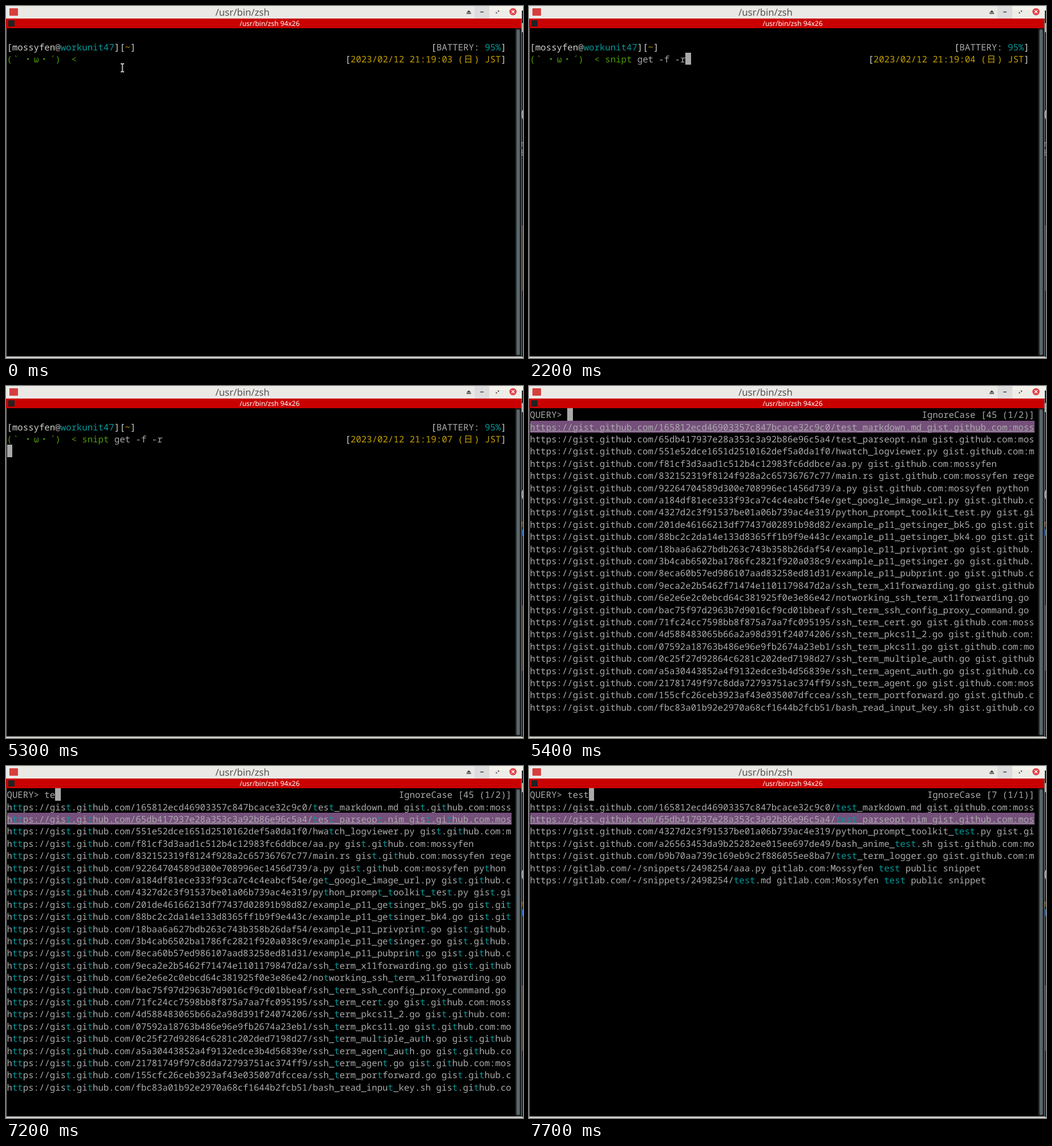
Animation of 906 by 618 pixels, one loop 8000 ms. Source, as an HTML page:

```html
<!DOCTYPE html>
<html lang="en">
<head>
<meta charset="utf-8">
<title>/usr/bin/zsh</title>
<style>
html, body { margin: 0; width: 100%; height: 100%; overflow: hidden; background: #000; }
#stage { position: absolute; left: 0; top: 0; width: 906px; height: 618px; overflow: hidden; background: #000; }
#stage svg { position: absolute; left: 0; top: 0; }
svg text { font-family: "Noto Sans", "Open Sans", sans-serif; text-rendering: geometricPrecision; text-anchor: middle; }
#term { font: 15.683px/21.4px "Noto Sans Mono", "DejaVu Sans Mono", monospace; text-rendering: geometricPrecision;
  font-kerning: none; font-variant-ligatures: none; color: #aaa; }
#term span, #term i { position: absolute; white-space: pre; }
#term i { height: 21.4px; }
#term b { font-weight: 400; color: #06989a; }
#term .hi { color: #d0d3cc; }
#term .cyan { color: #06989a; }
#term .yellow { color: #c4a000; }
#term .green { color: #4e9a06; }
#term .red { color: #cc0000; font-weight: 700; }
#term .dim { color: #5a5a5a; }
#term .dark { color: #1c1c1c; }
#term .black { color: #000; }
#term .sel { text-decoration: underline; }
#term .cjk { font-family: "Noto Sans Mono", "Noto Sans CJK JP", "Noto Sans CJK", sans-serif; }
</style>
</head>
<body>
<div id="stage">
  <svg width="906" height="618" viewBox="0 0 906 618">
    <rect width="906" height="22" fill="#ebe9e6"/>
    <rect x="821" width="26" height="22" fill="#dedddd"/>
    <rect x="847" width="56" height="22" fill="#efede8"/>
    <rect x="847" width="59" height="7" fill="#f4f2ea"/>
    <rect x="6" y="4" width="15" height="13" rx="1" fill="#d5403d"/>
    <text x="414.5" y="17" font-size="16.7" fill="#555">/usr/bin/zsh</text>
    <path d="M807 11.5l4-4 4 4zM807 12.6h8v1.4h-8z" fill="#444"/>
    <path d="M831 10.5h6" stroke="#444" stroke-width="1.5"/>
    <path d="M861 8h3v3zM858.5 10v3h3z" fill="#444"/>
    <circle cx="888.5" cy="10" r="6.3" fill="#e0444c"/>
    <path d="M886 7.5l5 5m0-5l-5 5" stroke="#fff" stroke-width="1.3"/>
    <rect y="22" width="903" height="17" fill="#c80000"/>
    <rect x="4" y="25" width="11" height="11" fill="#222"/>
    <text x="462" y="34.6" font-size="12" fill="#fff">/usr/bin/zsh 94x26</text>
    <rect y="39" width="1" height="577" fill="#8a8a8a"/>
    <rect x="892" y="39" width="11" height="576" fill="#171b1c"/>
    <rect x="894.5" y="41" width="6" height="572" rx="3" fill="#59666a"/>
    <rect x="903" y="22" width="1" height="594" fill="#77797a"/>
    <rect x="904" y="8" width="2" height="608" fill="#1d1d1d"/>
    <rect x="904" y="30" width="2" height="16" fill="#b5b5b5"/>
    <path d="M906.5 182q-4 8 0 17" fill="none" stroke="#ddd" stroke-width="1.5"/>
    <rect x="904" y="385" width="2" height="115" fill="#45423e"/>
    <rect y="615" width="904" height="1" fill="#8f8f8d"/>
    <rect y="616" width="906" height="2" fill="#d4d1ca"/>
    <path id="letter" d="M904 247v-8m0 2q1-2 2-2" fill="none" stroke="#aaa"/>
    <path id="box" d="M906 253h-2v9h2m0-5h-2" fill="none" stroke="#aaa"/>
    <rect id="blue" x="903" y="252" width="3" height="11" fill="#2c62ac"/>
  </svg>
  <div id="term"></div>
  <svg id="pointer" width="906" height="618" viewBox="0 0 906 618" fill="none">
    <path d="M201 101.5h2l1 1 1-1h2M204 102v13M201 115.5h2l1-1 1 1h2" stroke="#333" stroke-width="3"/>
    <path d="M201 101.5h2l1 1 1-1h2M204 102v13M201 115.5h2l1-1 1 1h2" stroke="#ddd" stroke-width="1.3"/>
  </svg>
</div>
<script>
const COLS = 94, CELL = 9.41, ROW = 21.4, LEFT = 1.55, TOP = 39.2, LOOP = 8000;
const USER = "mossyfen", HOST = "workunit47";
const $ = id => document.getElementById(id);

const gists = `165812ecd46903357c847bcace32c9c0/test_markdown.md
65db417937e28a353c3a92b86e96c5a4/test_parseopt.nim
551e52dce1651d2510162def5a0da1f0/hwatch_logviewer.py
f81cf3d3aad1c512b4c12983fc6ddbce/aa.py
832152319f8124f928a2c65736767c77/main.rs regex
92264704589d300e708996ec1456d739/a.py python
a184df81ece333f93ca7c4c4eabcf54e/get_google_image_url.py
4327d2c3f91537be01a06b739ac4e319/python_prompt_toolkit_test.py
201de46166213df77437d02891b98d82/example_p11_getsinger_bk5.go
88bc2c2da14e133d8365ff1b9f9e443c/example_p11_getsinger_bk4.go
18baa6a627bdb263c743b358b26daf54/example_p11_privprint.go
3b4cab6502ba1786fc2821f920a038c9/example_p11_getsinger.go
8eca60b57ed986107aad83258ed81d31/example_p11_pubprint.go
9eca2e2b5462f71474e1101179847d2a/ssh_term_x11forwarding.go
6e2e6e2c0ebcd64c381925f0e3e86e42/notworking_ssh_term_x11forwarding.go
bac75f97d2963b7d9016cf9cd01bbeaf/ssh_term_ssh_config_proxy_command.go
71fc24cc7598bb8f875a7aa7fc095195/ssh_term_cert.go
4d588483065b66a2a98d391f24074206/ssh_term_pkcs11_2.go
07592a18763b486e96e9fb2674a23eb1/ssh_term_pkcs11.go
0c25f27d92864c6281c202ded7198d27/ssh_term_multiple_auth.go
a5a30443852a4f9132edce3b4d56839e/ssh_term_agent_auth.go
21781749f97c8dda72793751ac374ff9/ssh_term_agent.go
155cfc26ceb3923af43e035007dfccea/ssh_term_portforward.go
fbc83a01b92e2970a68cf1644b2fcb51/bash_read_input_key.sh
a26563453da9b25282ee015ee697de49/bash_anime_test.sh
c4348860fe15ef4d7158b26d52f1e39f/ssh_term_http_proxy.go
8f7e1b06a9a6e0b6f43a10bf29850e3a/ssh_term_socks5_proxy.go
a90b01dee1e86f430a8f979c9b6022ec/ssh_term_multiple_proxy.go
1289a2ae2b308a16a3301e2db2b63cdd/ssh_term_proxy.go
038541ca650eab28bd32e98592193bf0/ssh_term_with_timestamp_log.go
b37c9600837f37b1bc5d8937e0276f08/ssh_term_with_log.go
c915d15f825624893d3983b8b462155e/term_ssh.go
b9b70aa739c169eb9c2f886055ee8ba7/test_term_logger.go
f19d1e94b5f89f3e1fef520d3ecc7b59/gistfile1.md text`;

const entries = gists.split("\n").map(line => {
  const [path, note = ""] = line.split(" ");
  return `https://gist.github.com/${path} gist.github.com:${USER} ${note}`;
});
for (const file of ["aaa.py", "test.md"])
  entries.push(`https://gitlab.com/-/snippets/2498254/${file} gitlab.com:Mossyfen test public snippet`);

const x = col => (LEFT + col * CELL).toFixed(2);
const y = row => TOP + row * ROW;
const esc = s => s.replace(/&/g, "&amp;").replace(/</g, "&lt;");
const html = (col, row, markup, cls = "") =>
  `<span class="${cls}" style="left:${x(col)}px;top:${(y(row) + 1).toFixed(2)}px">${markup}</span>`;
const put = (col, row, text, cls) => html(col, row, esc(text), cls);
const block = (col, row, color = "#aaa", cells = 1) =>
  `<i style="left:${x(col)}px;top:${y(row).toFixed(2)}px;width:${cells * CELL}px;background:${color}"></i>`;

// Prompt line; hint is the dim suggestion after the typed command.
function shell(cmd, sec, caret, hint = "") {
  const name = cmd.slice(0, 5), end = 14 + cmd.length;
  let out = put(0, 1, "[" + USER, "hi") + put(9, 1, "@") + put(10, 1, HOST, "cyan") +
    put(20, 1, "][", "hi") + put(22, 1, "~", "yellow") + put(23, 1, "]", "hi") +
    put(79, 1, "[", "hi") + put(80, 1, "BATTERY:") + put(89, 1, "95%", "cyan") + put(92, 1, "]", "hi") +
    put(0, 2, "(", "green") + put(1.2, 2, "`", "green") + put(3.1, 2, "・", "green cjk") + put(5, 2, "ω", "green") +
    put(6.1, 2, "・", "green cjk") + put(8, 2, "´)", "green") + put(12, 2, "<", "green") +
    put(63, 2, "[", "hi") + put(64, 2, "2023/02/12 21:19:0" + sec + " (", "yellow") +
    put(85.1, 2, "日", "yellow cjk") + put(87, 2, ") JST", "yellow") + put(92, 2, "]", "hi");
  if (caret) out += caret === "next" ? block(0, 3) : block(end, 2, hint ? "#666" : undefined);
  out += put(14, 2, name, name === "snipt" ? "green" : "red") + put(19, 2, cmd.slice(5));
  if (hint) out += put(end, 2, hint[0], "dark") + put(end + 1, 2, hint.slice(1), "dim");
  return out;
}

// Filter screen; needle may lag behind the typed query.
function picker(query, needle, count, sel = 2, more = "") {
  const info = `IgnoreCase [${count}]`;
  let out = block(7 + query.length, 0) + put(0, 0, "QUERY> " + query) + put(COLS - info.length, 0, info) +
    block(0, sel, "#75507b", COLS);
  entries.filter(e => e.includes(needle)).slice(0, 24).forEach((e, i) => {
    const line = e.slice(0, COLS);
    out += html(0, i + 1, needle ? line.replaceAll(needle, `<b>${needle}</b>`) : line, i + 1 === sel ? "sel" : "");
  });
  if (more === "block") out += block(COLS - 1, 25);
  if (more) out += put(COLS - 1, 25, "v", more === "block" ? "black" : "");
  return out;
}

const full = "snipt get -f -r";
const steps = [
  [0, () => shell("", 3)],
  [100, () => shell("", 4, "here")],
  [200, () => shell("s", 4, "here")],
  [400, () => shell("sn", 4, "here")],
  [600, () => shell("sni", 4, "here")],
  [800, () => shell("snip", 4, "here")],
  [900, () => shell("snipt", 4, "here")],
  [1000, () => shell("snipt ", 4, "here")],
  [1300, () => shell("snipt g", 4, "here", "et -f -r")],
  [1400, () => shell("snipt ge", 4, "here", "t -f -r")],
  [1600, () => shell("snipt get", 4, "here", " -f -r")],
  [1800, () => shell("snipt get ", 4, "here", "-f -r")],
  [2200, () => shell(full, 4, "here")],
  [2800, () => shell(full, 7, "here")],
  [2900, () => shell(full, 7, "next")],
  [3400, () => shell(full, 7)],
  [4100, () => shell(full, 7, "next")],
  [4700, () => shell(full, 7)],
  [5300, () => shell(full, 7, "next")],
  [5400, () => picker("", "", "45 (1/2)", 1)],
  [6400, () => picker("", "", "45 (1/2)", 2, "block")],
  [6900, () => picker("", "", "45 (1/2)", 2, "plain")],
  [7100, () => picker("t", "t", "45 (1/2)")],
  [7200, () => picker("te", "t", "45 (1/2)")],
  [7300, () => picker("te", "te", "25 (1/2)")],
  [7400, () => picker("tes", "tes", "7 (1/1)")],
  [7700, () => picker("test", "test", "7 (1/1)")]
];

let shown = -1;
const start = performance.now();
function tick(now) {
  const t = Math.max(0, now - start) % LOOP;
  const i = steps.findLastIndex(s => s[0] <= t);
  if (i !== shown) {
    shown = i;
    $("term").innerHTML = steps[i][1]();
    $("pointer").style.display = i ? "none" : "";
  }
  const late = t >= 3600;
  $("blue").style.display = late ? "" : "none";
  $("box").style.display = late ? "none" : "";
  $("letter").setAttribute("stroke", late ? "#c08a4a" : "#aaa");
  requestAnimationFrame(tick);
}
tick(start);
</script>
</body>
</html>
```
